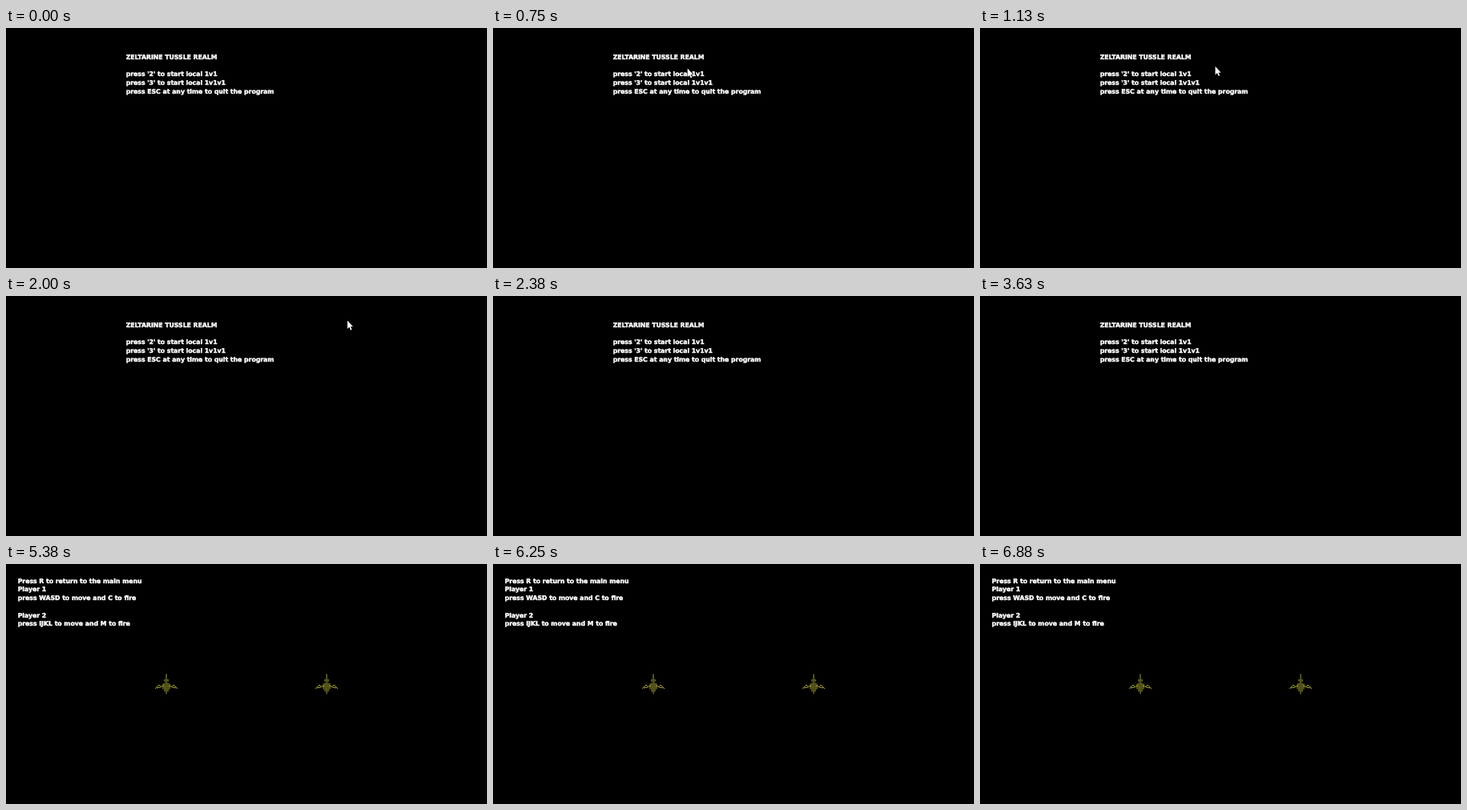
An HTML page for the animation above (8000 ms loop, 600 by 300 pixels).

```html
<!DOCTYPE html>
<html lang="en">
<head>
<meta charset="utf-8">
<title>Ship duel</title>
<style>
  html, body { margin: 0; width: 100%; height: 100%; overflow: hidden; background: #000; }
  svg { display: block; width: 100%; height: 100%; }
  text {
    font: bold 7.75px "DejaVu Sans", sans-serif;
    fill: #fff;
    stroke: #fff;
    stroke-width: .45;
    text-rendering: geometricPrecision;
  }
  #ship { fill: none; stroke: #a3a332; }
</style>
</head>
<body>
<svg viewBox="0 0 600 300">
  <defs>
    <g id="ship">
      <path id="hull"/>
      <path id="wing" d="M2 -6.5V-3.5M3 1.5L7 3L9 .5L14 5.5M7 3.5L12 4.5"/>
      <use href="#wing" transform="scale(-1 1)"/>
    </g>
  </defs>
  <g id="menu"></g>
  <g id="game">
    <use href="#ship" x="200" y="150.5"/>
    <use href="#ship" x="400" y="150.5"/>
  </g>
  <path id="cursor" fill="#fff" d="M0 0V10.4L2.4 8.2L4 12L5.6 11.3L4 7.7H7Z"/>
</svg>
<script>
const LOOP = 8000, TICK = 125, GAME_START = 5380, LINE = 10.75;
const byId = id => document.getElementById(id);
const menu = byId('menu'), game = byId('game'), cursor = byId('cursor');

// Each sweep is a curve from start through bend to end, timed in ticks.
const sweeps = [
  { first: 4, last: 9, hidden: 14, x: [341, 152, 293.5], y: [15.5, 77.5, 48] },
  { first: 14, last: 18, hidden: 19, x: [314, 435, 519.5], y: [46, 36.5, 3.5] },
  { first: 25, last: 28, hidden: 29, x: [354, 261, 311], y: [27, 94.5, 2.5] }
];

const curve = ([a, b, c], s) => (1 - s) ** 2 * a + 2 * s * (1 - s) * b + s * s * c;
const show = (node, on) => node.setAttribute('visibility', on ? 'visible' : 'hidden');

function addLines(group, x, y, lines) {
  lines.forEach((line, row) => {
    const text = document.createElementNS('http://www.w3.org/2000/svg', 'text');
    text.setAttribute('x', x);
    text.setAttribute('y', y + row * LINE);
    text.textContent = line;
    group.append(text);
  });
}

// Upright ribs, longest in the middle where the nose is.
function buildHull() {
  let path = '';
  for (let x = -4; x <= 4; x += 2) {
    const side = Math.abs(x);
    const top = side ? side / 2 - 3 : -13;
    path += `M${x} ${top}V${12 - side * 1.5}`;
  }
  byId('hull').setAttribute('d', path);
}

function drawCursor(tick) {
  const sweep = sweeps.find(({ first, hidden }) => tick >= first && tick < hidden);
  show(cursor, sweep);
  if (!sweep) return;
  const s = Math.min(1, (tick - sweep.first) / (sweep.last - sweep.first));
  cursor.setAttribute('transform', `translate(${curve(sweep.x, s)} ${curve(sweep.y, s)})`);
}

function draw(time) {
  const playing = time >= GAME_START;
  show(menu, !playing);
  show(game, playing);
  drawCursor(Math.floor(time / TICK));
}

addLines(menu, 149.7, 38.7, [
  'ZELTARINE TUSSLE REALM',
  '',
  "press '2' to start local 1v1",
  "press '3' to start local 1v1v1",
  'press ESC at any time to quit the program'
]);
addLines(game, 14.7, 23.7, [
  'Press R to return to the main menu',
  'Player 1',
  'press WASD to move and C to fire',
  '',
  'Player 2',
  'press IJKL to move and M to fire'
]);
buildHull();

const start = performance.now();
function loop() {
  draw((performance.now() - start) % LOOP);
  requestAnimationFrame(loop);
}
loop();
</script>
</body>
</html>
```
